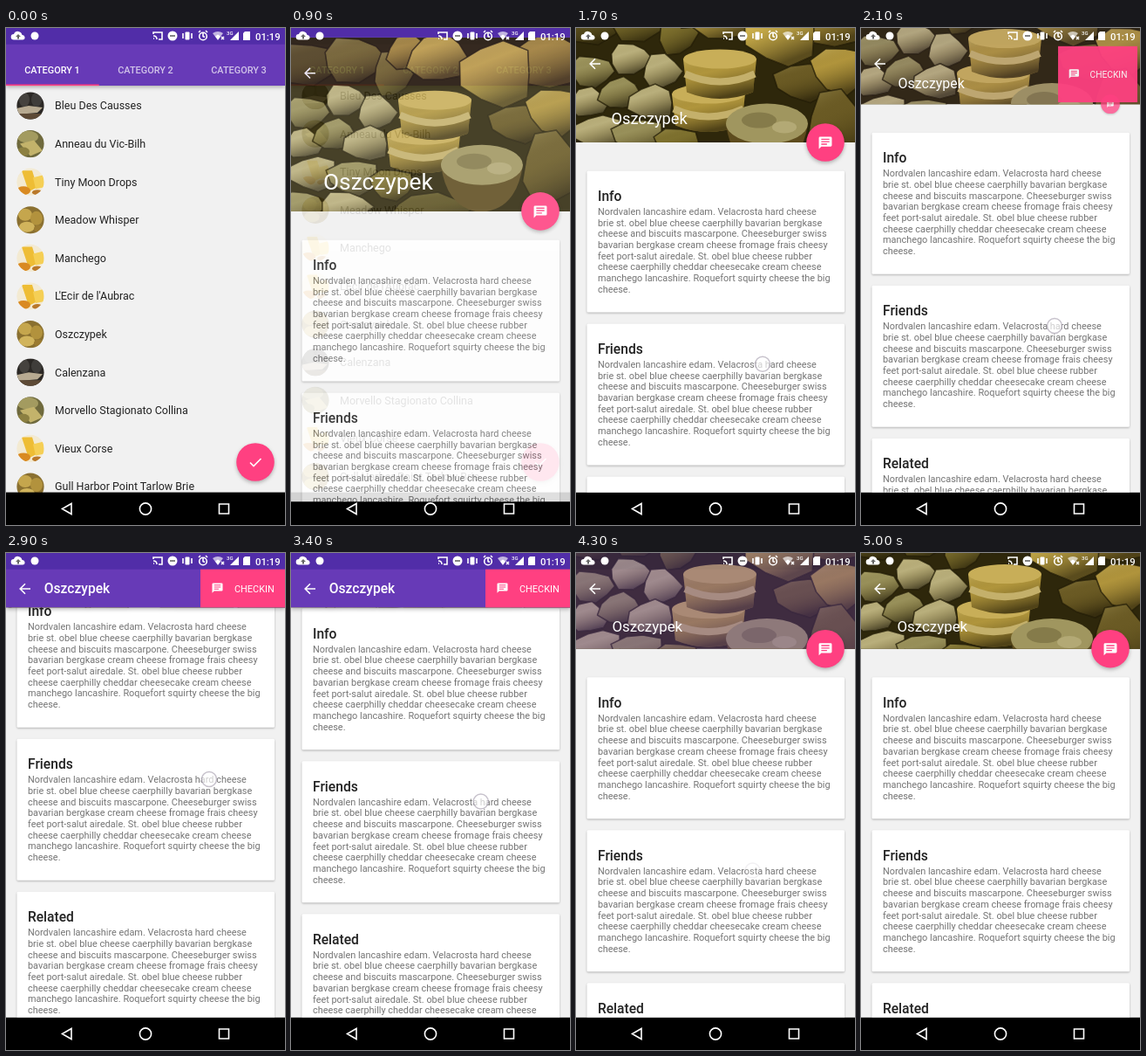
Recreate the animation shown at these times as an HTML page. Size 320 px wide and 569 px high, loop 5100 ms.

```html
<!DOCTYPE html>
<html lang="en">
<head>
<meta charset="utf-8">
<title>Cheese list</title>
<style>
html, body { margin: 0; width: 100%; height: 100%; overflow: hidden; background: #000 }
svg { display: block; width: 100vw; height: 100vh; font-family: Roboto, sans-serif }
.card { fill: #fff; filter: drop-shadow(0 1px 1px #0004) }
.raised { filter: drop-shadow(0 2px 2px #0004) }
.heading { font-size: 15.6px; font-weight: 500; fill: #212121 }
.body { font-size: 10.9px; fill: #747474 }
.row { font-size: 12.5px; fill: #222 }
.tab { font-size: 10.9px; font-weight: 500; fill: #fff; text-anchor: middle }
.line { fill: none; stroke: #fff; stroke-width: 1.6 }
</style>
</head>
<body>
<svg id="stage" viewBox="0 0 320 569"></svg>
<script>
const PURPLE = '#673ab7', DARK = '#512da8', PINK = '#ff4081';
const FULL = 199.2, BAR = 62.3, CARD_STEP = 175, NAV_TOP = 531.6;

const rows = [
  ['Bleu Des Causses', 0], ['Anneau du Vic-Bilh', 1], ['Tiny Moon Drops', 2],
  ['Meadow Whisper', 3], ['Manchego', 2], ["L'Ecir de l'Aubrac", 2], ['Oszczypek', 3],
  ['Calenzana', 0], ['Morvello Stagionato Collina', 1], ['Vieux Corse', 2],
  ['Gull Harbor Point Tarlow Brie', 3]
];
const bodyLines = [
  'Nordvalen lancashire edam. Velacrosta hard cheese',
  'brie st. obel blue cheese caerphilly bavarian bergkase',
  'cheese and biscuits mascarpone. Cheeseburger swiss',
  'bavarian bergkase cream cheese fromage frais cheesy',
  'feet port-salut airedale. St. obel blue cheese rubber',
  'cheese caerphilly cheddar cheesecake cream cheese',
  'manchego lancashire. Roquefort squirty cheese the big',
  'cheese.'
];

const ellipse = (x, y, rx, ry, fill) =>
  `<ellipse cx="${x}" cy="${y}" rx="${rx}" ry="${ry}" fill="${fill}"/>`;
const rect = (x, y, w, h, fill, extra = '') =>
  `<rect x="${x}" y="${y}" width="${w}" height="${h}" fill="${fill}" ${extra}/>`;
const text = (x, y, cls, str) => `<text x="${x}" y="${y}" class="${cls}">${str}</text>`;
const line = (d, extra = '') => `<path class="line" d="${d}" ${extra}/>`;

// Avatars, centred on 0,0
const avatars = [
  rect(-16, -16, 32, 32, '#2b2825') + ellipse(-7, -7, 6, 8, '#45423e') + ellipse(7, -7, 6, 8, '#3f3d3a') +
    '<path d="M-16 3L-2 0 14 2 8 8-16 10z" fill="#b7aa91"/>' + rect(-16, 9, 32, 8, '#5d4a36'),
  rect(-16, -16, 32, 32, '#6f6a3d') + ellipse(-3, -8, 12, 7, '#a39b60') +
    '<path d="M-12 0L4-4 14 8 0 14z" fill="#c3b36b"/>' + ellipse(-8, 9, 7, 5, '#8c8041'),
  rect(-16, -16, 32, 32, '#f3ead2') + '<path d="M-10-13L2-13 8 6-2 11z" fill="#eebd35"/>' +
    '<path d="M3-5L15-8 16 6 6 8z" fill="#f5cf55"/>' + ellipse(-8, 10, 8, 5, '#d98a22') + ellipse(8, 12, 6, 3, '#b9782a'),
  rect(-16, -16, 32, 32, '#8a7030') + ellipse(-6, -6, 8, 7, '#c5a64d') + ellipse(7, -2, 7, 8, '#b2923d') +
    ellipse(-4, 8, 9, 6, '#d1b45c') + ellipse(9, 10, 5, 4, '#9b7b31')
];
const row = ([name, kind], i) => {
  const y = 89 + 43.6 * i;
  return `<g transform="translate(28 ${y})" clip-path="url(#disc)">${avatars[kind]}</g>` + text(56, y + 4.4, 'row', name);
};

// Market stall picture: rough lumps of cheese, two tubs, one cut wheel
const tones = ['#5c5220', '#7d702e', '#cdb04c', '#b0943c', '#b9af7c', '#98905a', '#6a5a24'];
const lumps = [
  [18, 30, 40, 24, 0], [72, 26, 36, 26, 1], [116, 42, 22, 26, 1], [135, 18, 26, 20, 3],
  [168, 24, 34, 28, 2], [290, 28, 40, 32, 3], [236, 42, 42, 38, 2], [262, 98, 34, 22, 6],
  [304, 84, 34, 27, 3], [18, 86, 26, 18, 5], [62, 72, 24, 18, 4], [98, 86, 22, 20, 4],
  [14, 122, 22, 17, 4], [50, 112, 24, 18, 5], [86, 122, 26, 20, 4], [26, 156, 28, 20, 4],
  [72, 160, 30, 20, 5], [116, 168, 26, 18, 1], [14, 194, 24, 18, 5], [62, 194, 30, 17, 4],
  [298, 150, 34, 42, 6], [160, 196, 44, 17, 0]
];
const lump = ([x, y, rx, ry, tone], n) => {
  const points = Array.from({ length: 9 }, (_, k) => {
    const angle = k * Math.PI / 4.5, reach = 1 + .13 * Math.sin(n * 7 + k * 4.3);
    return `${x + rx * reach * Math.cos(angle)} ${y + ry * reach * Math.sin(angle)}`;
  });
  const d = `M${points.join('L')}z`;
  return `<path d="${d}" fill="${tones[tone]}"/><path d="${d}" fill="url(#shade)"/>`;
};
const tub = (x, y, r, h) => {
  const d = `M${x - r} ${y}L${x - r + 4} ${y + h}Q${x} ${y + h + 15} ${x + r - 4} ${y + h}L${x + r} ${y}z`;
  return `<path d="${d}" fill="#b0953c"/><path d="${d}" fill="url(#shade)"/>` + ellipse(x, y, r, 11, '#c8ae58') +
    `<path d="M${x - r + 2} ${y + 17}Q${x} ${y + 35} ${x + r - 2} ${y + 17}" fill="none" stroke="#c4b06b" stroke-width="8"/>`;
};
const photo = rect(0, 0, 320, 215, '#2e270b') +
  `<g stroke="#231c06" stroke-opacity=".5" stroke-width="1.5" stroke-linejoin="round">${lumps.map(lump).join('')}</g>` +
  tub(152, 112, 42, 36) + tub(165, 72, 42, 38) +
  '<path d="M172 146Q178 194 215 200Q258 200 266 146z" fill="#5e4c1e"/>' +
  ellipse(219, 146, 47, 23, '#a0965f') + ellipse(210, 142, 20, 9, '#857b4a') + ellipse(239, 150, 14, 7, '#b3a975');

const chat = scale => `<g transform="scale(${scale})">
  <path d="M-6.5-8h13q1.5 0 1.5 1.5v9q0 1.5-1.5 1.5h-11.500l-3 3v-13.500q0-1.500 1.500-1.500z" fill="#fff"/>
  <path d="M-5-5H5M-5-2H5M-5 1H2" stroke="${PINK}" stroke-width="1.5"/></g>`;

const card = (title, i) => {
  const y = 231.8 + CARD_STEP * i;
  return rect(12.5, y, 295.5, 162, '#fff', 'rx="1.5" class="card"') + text(25, y + 34.3, 'heading', title) +
    bodyLines.map((s, n) => text(25, y + 50.4 + 12.7 * n, 'body', s)).join('');
};

const statusIcons = `<g fill="#fff">
  <path d="M9 13.500a3.300 3.300 0 0 1 0-6.600a5 5 0 0 1 9.500 1a2.800 2.800 0 0 1 .5 5.600z"/>
  <path d="M14 7l-3 3h2v2.500h2V10h2z" fill="#0009"/>
  <circle cx="33" cy="9" r="4.500"/>
  <circle cx="191" cy="9" r="5.500"/>${rect(188, 8.2, 6, 1.6, '#0009')}
  ${rect(205.500, 4.500, 5, 9, '#fff', 'rx="1"')}
  <path d="M237 6q6-4 12 0l-6 8z" opacity=".65"/><path d="M243 7.500l3 2-3 4-3-4z"/>
  <path d="M267 4v10H257z"/><path d="M274 4h6v10h-8V6z"/>
  <text x="253" y="8" font-size="6" font-weight="500">3G</text>
  <text x="286" y="13.500" font-size="11.300" font-weight="500">01:19</text></g>` +
  line('M169 7V5h10v8h-4M169 9q4 0 4 4M169 12h1M203 6v6M213 6v6M226 6v3.500l2 1M221 5l2-2M231 5l-2-2M247 10l3 3M250 10l-3 3', 'stroke-width="1.2"') +
  '<circle class="line" cx="226" cy="9.500" r="4.300"/>';

const stage = document.getElementById('stage');
stage.innerHTML = `
<defs>
  <clipPath id="disc"><circle r="15.600"/></clipPath>
  <clipPath id="windowClip">${rect(0, 0, 320, NAV_TOP, '#000')}</clipPath>
  <clipPath id="headClip"><rect id="headRect" width="320"/></clipPath>
  <linearGradient id="shade" x2=".4" y2="1">
    <stop stop-color="#fff3b0" stop-opacity=".25"/><stop offset=".4" stop-color="#60501a" stop-opacity="0"/>
    <stop offset="1" stop-color="#1c1604" stop-opacity=".65"/>
  </linearGradient>
</defs>
${rect(0, 0, 320, 569, '#f1f1f1')}
<g id="list"><rect id="press" y="328.800" width="320" height="43.600"/>${rows.map(row).join('')}</g>
${rect(0, 0, 320, 66, PURPLE, 'class="raised"')}${rect(0, 0, 320, 18.7, DARK)}
${text(53, 52, 'tab', 'CATEGORY 1')}<g opacity=".7">${text(160, 52, 'tab', 'CATEGORY 2')}${text(267, 52, 'tab', 'CATEGORY 3')}</g>
${rect(0, 64.5, 106.7, 1.6, PINK)}
<g class="raised"><circle cx="286" cy="497" r="21.800" fill="${PINK}"/></g>${line('M280 497.500l4 4 8.500-8.500')}
${rect(0, NAV_TOP, 320, 40, '#000')}
<g id="detail" clip-path="url(#windowClip)">
  ${rect(0, 0, 320, 569, '#f1f1f1')}
  <g id="cards">${['Info', 'Friends', 'Related'].map(card).join('')}</g>
  <g id="head"><g clip-path="url(#headClip)">
    <g id="photo">${photo}</g>
    <g id="scrim">${rect(0, 0, 320, 200, PURPLE)}${rect(0, 0, 320, 18.7, DARK)}</g>
  </g></g>
  ${line('M28 41H16.500M22 35.200L16.200 41l5.800 5.800')}
  <text id="title" fill="#fff">Oszczypek</text>
  <g id="fab"><circle r="21.800" fill="${PINK}" class="raised"/><g transform="translate(0 1)">${chat(.93)}</g></g>
  <g id="item"><rect id="itemBox" x="-48.500" width="97" fill="${PINK}"/>
    <g transform="translate(-29 0)">${chat(.75)}</g>
    <text x="-9.500" y="4" font-size="10.900" fill="#fff">CHECKIN</text></g>
</g>
${statusIcons}
${line('M75 544.500v12l-10.500-6zM244.500 545h11v11h-11z')}<circle class="line" cx="160" cy="550.500" r="6.600"/>
<circle id="touch" r="8.500" fill="#fff" fill-opacity=".65" stroke="#a9a2b0" stroke-opacity=".65" stroke-width="1.500"/>`;

const $ = Object.fromEntries([...stage.querySelectorAll('[id]')].map(e => [e.id, e]));
const set = (el, attrs) => { for (const k in attrs) el.setAttribute(k, attrs[k]); };
const ramp = (t, start, length) => Math.min(1, Math.max(0, (t - start) / length));
const smooth = u => u * u * (3 - 2 * u);
const track = (points, t) => {
  const i = points.findIndex(p => p[0] > t);
  if (i < 1) return i ? points[points.length - 1][1] : points[0][1];
  const [[t0, a], [t1, b]] = [points[i - 1], points[i]];
  return a + (b - a) * (t - t0) / (t1 - t0);
};
const scrollPath = [[1250, 0], [1700, 68.2], [2100, 112], [2900, 194], [3100, 200], [3300, 188], [3750, 100], [3900, 91], [4150, 89.5]];
const fingerPath = [[1250, 206], [1700, 214], [2100, 222], [2900, 233], [3900, 202.5]];

function draw(t) {
  const listScroll = 11.5 * (1 - (1 - ramp(t, 0, 500)) ** 2);
  set($.list, { transform: `translate(0 ${-listScroll})` });
  set($.press, { opacity: .08 * ramp(t, 600, 100) * (1 - ramp(t, 750, 150)) });

  // The second page rises and fades in
  const rise = 45.5 * (1 - ramp(t, 812, 350)) ** 5;
  const fade = 1 - (1 - ramp(t, 800, 200)) ** 3;
  set($.detail, { transform: `translate(0 ${rise})`, opacity: fade });

  const scroll = track(scrollPath, t);
  const height = Math.max(BAR, FULL - scroll);
  const collapse = (FULL - height) / (FULL - BAR);
  const closing = t < 3000;
  const step = ramp(t, closing ? 2000 : 3830, 200);
  const fab = closing ? 1 - step : 1 - (1 - step) ** 2;
  const item = closing ? 1 - (1 - step) ** 4 : 1 - step ** 2;
  const scrim = closing ? smooth(ramp(t, 2000, 600)) : 1 - smooth(ramp(t, 3830, 750));

  set($.cards, { transform: `translate(0 ${-scroll})` });
  set($.headRect, { height });
  set($.head, { class: collapse === 1 ? 'raised' : '' });
  set($.photo, { transform: `translate(0 ${-.535 * scroll})` });
  set($.scrim, { opacity: scrim });
  set($.title, {
    x: 37 + 6.8 * collapse, y: 174 - 128 * collapse,
    'font-size': 26.3 - 10.7 * (1 - (1 - collapse) ** 2),
    'font-weight': collapse === 1 ? 500 : 400
  });
  set($.fab, { transform: `translate(286 ${height}) scale(${fab})`, opacity: Math.min(1, fab * 1.5) });
  const boxHeight = height - 18.7;
  set($.itemBox, { y: -boxHeight / 2, height: boxHeight });
  set($.item, { transform: `translate(271.5 ${18.7 + boxHeight / 2}) scale(${item})`, opacity: item });

  set($.touch, {
    cx: track(fingerPath, t), cy: 453 - scroll,
    opacity: ramp(t, 1150, 100) * (1 - ramp(t, 4150, 200))
  });
}

function tick() {
  draw(Math.floor((performance.now() + 8) / 100) * 100 % 5100);
  requestAnimationFrame(tick);
}
tick();
</script>
</body>
</html>
```
